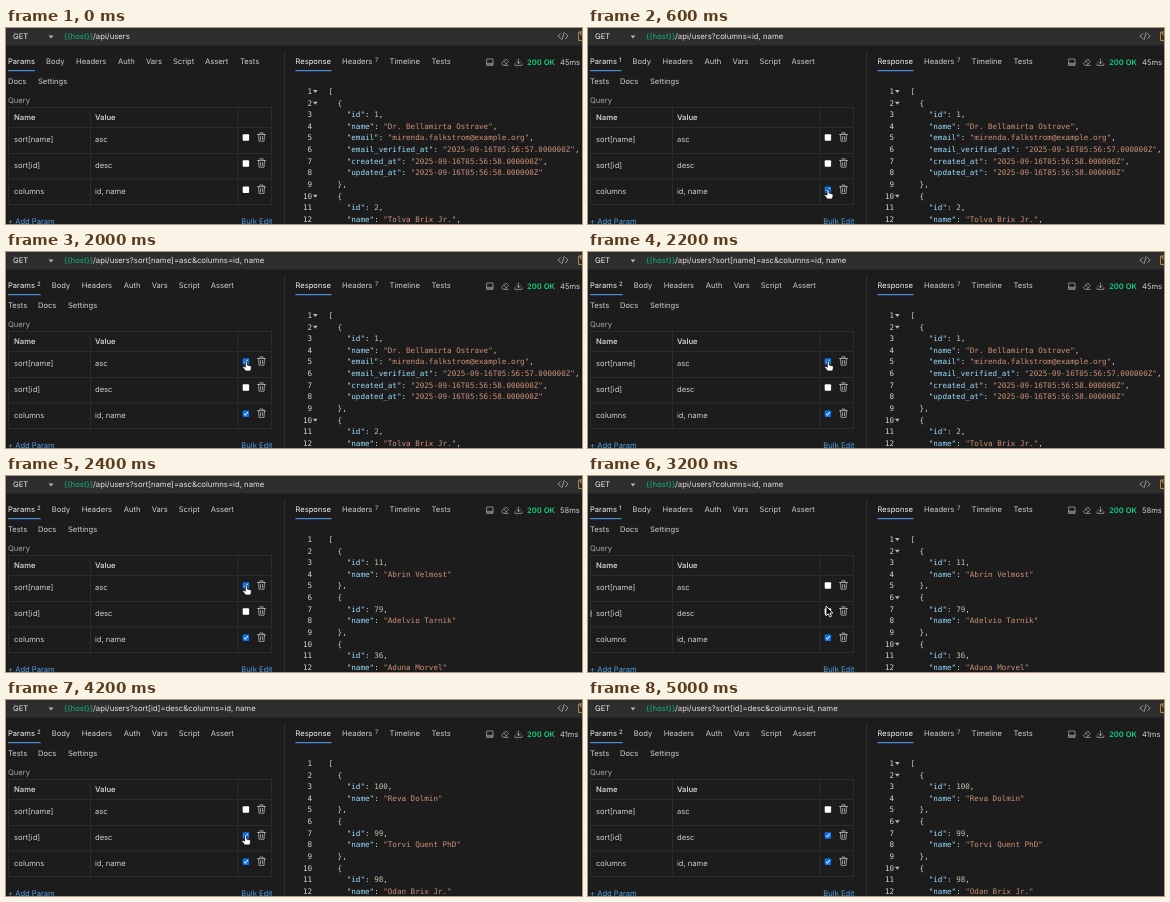
An HTML page that plays this animation: 576x196 px, repeating every 5200 ms.

```html
<!DOCTYPE html>
<html lang="en">
<head>
<meta charset="utf-8">
<title>API client: sorting query parameters</title>
<style>
  html, body { margin: 0; width: 100%; height: 100%; overflow: hidden; background: #1c1c1c; }
  svg { display: block; width: 576px; height: 196px; }
  text { font: 7.6px Inter, sans-serif; fill: #cecece; white-space: pre; text-rendering: geometricPrecision; }
  .code { font: 7.58px "DejaVu Sans Mono", monospace; fill: #d4d4d4; }
  .key { fill: #9cdcfe; }
  .str { fill: #ce9178; }
  .num { fill: #b5cea8; }
  .bold { font-weight: 600; }
  .small { font-size: 6px; }
  .active { fill: #f2f2f2; }
  .url { font-size: 7.75px; fill: #e2e2e2; }
  .label { fill: #a5a5a5; }
  .link { fill: #4d9fe0; }
  .ok { fill: #0fd07f; }
  .var { fill: #0fb877; }
  .end { text-anchor: end; }
  .icon { fill: none; stroke: #b5b5b5; stroke-width: .8; stroke-linejoin: round; stroke-linecap: round; }
</style>
</head>
<body>
<svg id="stage" viewBox="0 0 576 196"></svg>
<script>
const LOOP = 5200, STEP = 200, LINE = 11.63;
const stage = document.getElementById('stage');

const text = (x, mid, content, cls = '') =>
  `<text x="${x}" y="${mid + 2.7}" class="${cls}">${content}</text>`;
const rect = (x, y, w, h, fill, more = '') =>
  `<rect x="${x}" y="${y}" width="${w}" height="${h}" fill="${fill}" ${more}/>`;
const icon = (x, y, d, scale = 1) =>
  `<path class="icon" transform="translate(${x} ${y}) scale(${scale})" d="${d}"/>`;
const underline = (x, w) => rect(x, 42, w, 1.2, '#4a90d9');
const caret = (x, y) => `<path d="M${x - 2.4} ${y - 1.2}h4.8l-2.4 3z" fill="#b8b8b8"/>`;
const during = (t, from, to) => t >= from && t < to;

const rows = [
  { name: 'sort[name]', value: 'asc', y: 111.5, on: t => during(t, 1600, 2800) },
  { name: 'sort[id]', value: 'desc', y: 137.5, on: t => t >= 3600 },
  { name: 'columns', value: 'id, name', y: 163.7, on: t => t >= 600 },
];

const stamp = s => `2025-09-16T05:56:${s}.000000Z`;
const responses = [
  { from: 0, folds: 0, ms: 45, users: [
    { id: 1, name: 'Dr. Bellamirta Ostrave', email: 'mirenda.falkstrom@example.org',
      email_verified_at: stamp(57), created_at: stamp(58), updated_at: stamp(58) },
    { id: 2, name: 'Tolva Brix Jr.', email: 'tolva@example.org' }] },
  { from: 2400, folds: 2600, ms: 58, users: [
    { id: 11, name: 'Abrin Velmost' }, { id: 79, name: 'Adelvio Tarnik' }, { id: 36, name: 'Aduna Morvel' }] },
  { from: 4200, folds: 4600, ms: 41, users: [
    { id: 100, name: 'Reva Dolmin' }, { id: 99, name: 'Torvi Quent PhD' }, { id: 98, name: 'Odan Brix Jr.' }] },
];

// time, x, y of the pointer tip, and whether it is a hand
const pointerKeys = [
  [200, 262, 196, 0], [600, 240, 161, 1], [800, 240, 161, 0], [1200, 244, 113, 0],
  [1400, 240.3, 109, 1], [2800, 240.3, 109, 0], [3200, 238, 130, 0],
  [3400, 239.5, 135, 1], [4400, 239.5, 135, 0], [4800, 262, 196, 0],
];

function pointerAt(t) {
  const i = pointerKeys.findLastIndex(k => k[0] <= t);
  if (i < 0 || i === pointerKeys.length - 1) return null;
  const [t0, x0, y0, hand] = pointerKeys[i], [t1, x1, y1] = pointerKeys[i + 1];
  const p = (t - t0) / (t1 - t0);
  return { x: x0 + (x1 - x0) * p, y: y0 + (y1 - y0) * p, hand };
}

function pointer({ x, y, hand }) {
  const shape = hand
    ? 'M-1 .8Q0-.6 1 .8V4l3.6 1Q5.4 5.4 5 7.2L4.3 10H-.8L-3.6 6.2Q-3.6 4.6-2 5.4L-1 6.2z'
    : 'M0 0V9.8L2.3 7.7 3.8 11 5.5 10.2 4 7H7z';
  const colors = hand ? 'fill="#fff" stroke="#111"' : 'fill="#000" stroke="#fff"';
  return `<path transform="translate(${x} ${y})" d="${shape}" ${colors} stroke-width=".8"/>`;
}

function urlBar(t) {
  const query = rows.filter(r => r.on(t)).map(r => `${r.name}=${r.value}`).join('&amp;');
  return rect(0, 0, 576, 17.5, '#2e2e2e')
    + text(7, 8.3, 'GET', 'active') + caret(45, 8.6)
    + text(58, 8.3, `<tspan class="var">{{host}}</tspan>/api/users${query && '?' + query}`, 'url')
    + icon(557, 8.2, 'M-2.5-2.5L-5 0l2.5 2.5M2.5-2.5L5 0 2.5 2.5M1-3.5L-1 3.5')
    + '<path class="icon" style="stroke:#d9a342" d="M578 4h-5.5v8.5h5.5M574.5 4v2.5h4"/>';
}

function requestTabs(t) {
  const count = rows.filter(r => r.on(t)).length;
  const shift = [0, 4.6, 5.7][count];
  const tabs = [['Body', 40], ['Headers', 70], ['Auth', 112], ['Vars', 140], ['Script', 167], ['Assert', 199]];
  const wrapped = count ? [['Tests', 2], ['Docs', 32], ['Settings', 62]] : [['Docs', 2], ['Settings', 32]];
  return text(2, 33.5, 'Params', 'active')
    + (count ? text(31, 30.8, count, 'small active') : text(234, 33.5, 'Tests'))
    + tabs.map(([name, x]) => text(x + shift, 33.5, name)).join('')
    + wrapped.map(([name, x]) => text(x, 53, name)).join('')
    + underline(2, 27 + shift);
}

function checkbox(y, on) {
  return rect(236.7, y - 3.2, 6.4, 6.4, on ? '#0a74f0' : '#fff', 'rx="1"')
    + (on ? `<path d="M238.1 ${y + .1}l1.3 1.5 2.3-3.4" fill="none" stroke="#fff" stroke-width="1"/>` : '');
}

function table(t, mouse) {
  const lines = [79, 99, 125, 150.5, 176].map(y => rect(2, y, 264, .8, '#303030')).join('')
    + [2, 84, 231.5, 265.2].map(x => rect(x, 79, .8, 97, '#303030')).join('');
  const body = rows.map(r => {
    const hovered = mouse && !mouse.hand && Math.abs(mouse.y + 3 - r.y) < 12;
    return text(8, r.y, r.name) + text(89, r.y, r.value) + checkbox(r.y - 2, r.on(t))
      + icon(255.5, r.y - 2.5, 'M-4-2.5H4M-1.5-2.5V-4.2h3v1.7M-3-2.5l.5 6.7h5l.5-6.7M-1-.5v3M1-.5v3')
      + (hovered ? rect(2.6, r.y - 3, 1, 6.5, '#b5b5b5') : '');
  }).join('');
  return text(2, 72, 'Query', 'label') + lines
    + text(8, 89, 'Name', 'bold') + text(89, 89, 'Value', 'bold') + body
    + text(2, 193.3, '+ Add Param', 'link') + text(266.5, 193.3, 'Bulk Edit', 'link end');
}

function jsonLines(users) {
  const lines = ['['];
  for (const user of users) {
    lines.push('  {');
    const fields = Object.entries(user);
    fields.forEach(([key, value], i) => {
      const shown = typeof value === 'number'
        ? `<tspan class="num">${value}</tspan>` : `<tspan class="str">"${value}"</tspan>`;
      lines.push(`    <tspan class="key">"${key}"</tspan>: ${shown}${i < fields.length - 1 ? ',' : ''}`);
    });
    lines.push('  },');
  }
  return lines.slice(0, 12);
}

function responsePane(t) {
  const { users, ms, folds } = responses.findLast(r => r.from <= t);
  const code = jsonLines(users).map((line, i) => {
    const y = 63.2 + i * LINE;
    const opens = /[[{]$/.test(line);
    return text(306, y, i + 1, 'code end') + text(322.5, y, line, 'code')
      + (opens && t >= folds ? caret(309.3, y) : '');
  }).join('');
  return rect(278, 23, 1, 173, '#303030')
    + text(289.5, 33.5, 'Response', 'active') + underline(289.5, 36)
    + text(336, 33.5, 'Headers') + text(369, 30.8, '7', 'small')
    + text(383.5, 33.5, 'Timeline') + text(425.5, 33.5, 'Tests')
    + icon(484, 34.4, 'M-3.5-4H3.5V3.5H-3.5zM-3.5 1H3.5M-3 2.2H3', .85)
    + icon(499, 34.4, 'M-4 1L1-4 4-1-.5 3.5H-2zM-1.5-1.5L1.5 1.5M0 3.5H4', .85)
    + icon(512.5, 34.4, 'M0-4V1.5M-2.5-1L0 1.5 2.5-1M-4 1.5V3.5H4V1.5', .85)
    + text(521, 33.8, '200 OK', 'ok bold') + text(554, 33.8, `${ms}ms`)
    + code;
}

let shownTime = -1;
function frame(now) {
  const t = Math.floor(now % LOOP / STEP) * STEP;
  if (t !== shownTime) {
    shownTime = t;
    const mouse = pointerAt(t);
    stage.innerHTML = urlBar(t) + requestTabs(t) + table(t, mouse) + responsePane(t) + (mouse ? pointer(mouse) : '');
  }
  requestAnimationFrame(frame);
}
frame(performance.now());
</script>
</body>
</html>
```
